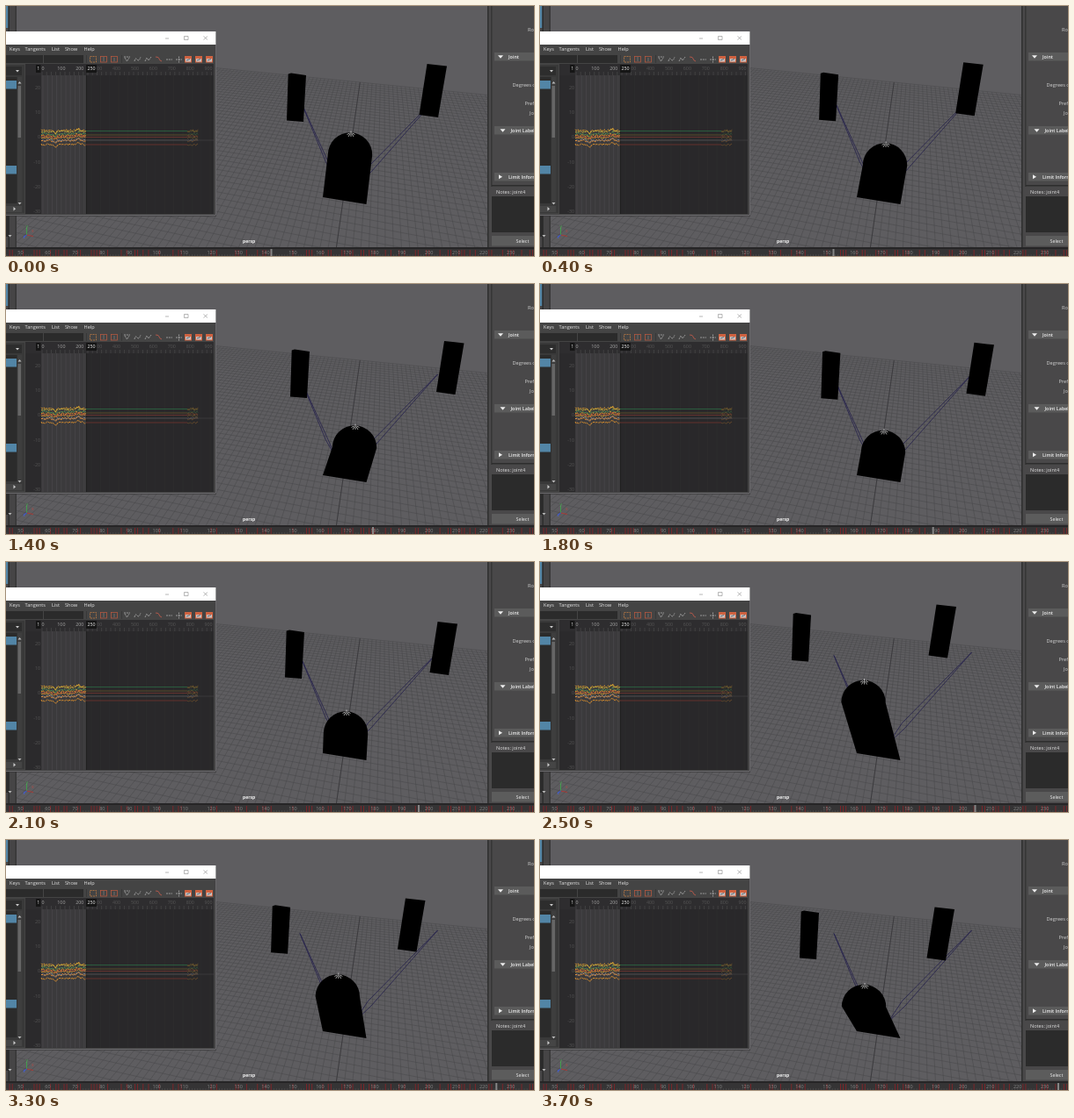
Animation of 600x285 px, one loop 3800 ms. Source, as an HTML page:

```html
<!DOCTYPE html>
<html lang="en">
<head>
<meta charset="utf-8">
<title>Graph editor and viewport</title>
<style>
html, body { margin: 0; width: 100%; height: 100%; overflow: hidden; background: #5e5d60; }
svg { display: block; width: 100vw; height: 100vh; }
text { font-family: "Open Sans", "Noto Sans", sans-serif; }
</style>
</head>
<body>
<svg id="stage" viewBox="0 0 600 285" preserveAspectRatio="none">
  <defs><clipPath id="view"><rect x="12" width="536" height="275"/></clipPath></defs>
  <g id="floor" clip-path="url(#view)"></g>
  <g id="rig">
    <path d="M334 106.500L363.500 178L376 200M334 106.500L368.500 183L376 200M490.500 103L411.500 183.500L396 207M490.500 103L415 189L396 207" fill="none" stroke="#221e4b" stroke-width=".75"/>
    <path id="left" d="M320.700 77.500L324 76.500L341 79L338 132L319 130.500Z"/>
    <path id="right" d="M478.500 66L501 68.500L491 127L469.500 124Z"/>
    <path id="body"/>
    <path id="joint" d="M-4.500 1L-1.500 -.5M-3 3.500L-1 0M0 3.500V-3M3 3.500L1 0M4.500 1L1.500 -.5" fill="none" stroke="#e4e4e4" stroke-width=".7"/>
  </g>
  <g id="ui"></g>
  <rect id="head" y="277" width="2" height="8" fill="#858585"/>
</svg>
<script>
const $ = id => document.getElementById(id);

let seed = 11;
const rnd = () => (seed = (seed * 16807) % 2147483647) / 2147483647;

const box = (x, y, w, h, fill, extra = '') =>
  `<rect x="${x}" y="${y}" width="${w}" height="${h}" fill="${fill}" ${extra}/>`;
const line = (d, color, w = 1, extra = '') =>
  `<path d="${d}" fill="none" stroke="${color}" stroke-width="${w}" ${extra}/>`;
const shape = (d, fill) => `<path d="${d}" fill="${fill}"/>`;
const label = (x, y, s, color = '#d2d2d2', size = 5.6, extra = '') =>
  `<text x="${x}" y="${y}" fill="${color}" font-size="${size}" ${extra}>${s}</text>`;
const mid = 'text-anchor="middle"';

// Perspective floor: both line families run to vanishing points on one horizon.
function drawFloor() {
  const hor = -100, vx = 429, wx = -1460, top = 187, slope = top / 1863;
  let rows = '', cols = '';
  const row = y => {
    const x = vx - (y - hor) * 27 / 190, k = (y - hor) / (x - wx);
    return `M0 ${hor - k * wx}L600 ${hor + k * (600 - wx)}`;
  };
  const col = x => {
    const m = (x - vx) / (285 - hor);
    const dy = slope * (vx - wx) / (1 - slope * m);
    return `M${vx + m * dy} ${hor + dy}L${x} 285`;
  };
  for (let n = 0; n < 52; n++) rows += row(hor + 1 / (1 / top - n / 15500));
  for (let j = -90; j < 60; j++) cols += col(374 + 9.5 * j);
  return line(rows + cols, '#474649', .5) + line(col(374), '#38373a', .8);
}

function drawCurves() {
  const sets = [
    [142, '#eda32c'], [143, '#d8c03c'], [146, '#4fa85a'], [147.5, '#ec942a'],
    [150, '#dcae33'], [149, '#c9553c'], [153, '#8d97a6'], [153.5, '#ea8c2c'],
    [158, '#f09a2c']
  ];
  let out = '';
  const noise = (y, from, to, amp) => {
    let d = '';
    for (let x = from; x <= to; x += 1.1) {
      const dip = 2.6 * Math.exp(-((x - 56) ** 2) / 5) - 2 * Math.exp(-((x - 82) ** 2) / 8);
      d += `${d ? 'L' : 'M'}${x.toFixed(1)} ${(y + dip + (rnd() - .5) * amp).toFixed(1)}`;
    }
    return d;
  };
  for (const [y, c] of sets) {
    out += line(noise(y, 40, 91, 2.4), c, .9, 'stroke-dasharray="2.5 .8"');
    out += line(noise(y, 206, 219, 2.6), c, .6, 'opacity=".4"');
  }
  [[142.5, '#2c6b45'], [147, '#65542c'], [149.5, '#74352f'], [153, '#4d4d50'], [158, '#71342f']]
    .forEach(([y, c]) => out += line(`M91 ${y}H206`, c, .8));
  return out;
}

function drawWindow() {
  let s = box(0, 29, 239, 210.500, '#333') + line('M238.300 44V238.300H0', '#77767a', 1) +
    box(0, 29, 238.5, 15, '#fff') + box(0, 44, 237.5, 193.5, '#444');
  s += line('M181 37H185M202.500 34.500H207V38.500H202.500ZM224.500 34.500L229 38.500M229 34.500L224.500 38.500', '#888', .6);
  [[4, 'Keys'], [21.5, 'Tangents'], [52, 'List'], [67, 'Show'], [88.5, 'Help']]
    .forEach(([x, t]) => s += label(x, 51.2, t, '#e4e4e4'));
  s += box(0, 56, 42, 9, '#2b2b2b') + box(43, 56, 45, 9, '#2b2b2b') + line('M91.500 56V65M131.500 56V65', '#333', .7);
  [99, 111, 123].forEach((x, i) =>
    s += box(x - 3.5, 57.5, 7, 6.5, 'none', `stroke="${i ? '#c05a3f' : '#cf8144'}" stroke-width=".7" ${i ? '' : 'stroke-dasharray="2 1"'}`));
  s += line('M111 58V63M123 59V63', '#999', .5);
  s += line('M134 58H141M135 59L137.500 63L140 59M146 63Q147 58 149 61T153 58M158 63L160 59L162 62L165 58M182 61H189M193 61H200M196.500 57.500V64.500', '#bdbdbd', .7, 'stroke-dasharray="2 .8"');
  s += line('M170 58Q174 58 174 60T177 63', '#c85c4c', .8);
  [207, 219, 231].forEach(x =>
    s += box(x - 4, 57, 8, 7.5, '#cf6240') + box(x - 3, 60, 6, 3.5, '#c9c3c2') + line(`M${x - 2} 62L${x + 2} 60.500`, '#46505c', .8));

  // Outliner column
  s += box(0, 67, 21, 169, '#393939') + box(0, 69, 18, 10, '#2d2d2d') +
    shape('M11 73h4l-2 2.500z', '#ccc') +
    box(0, 81, 12.5, 144, '#2b2b2b') + box(0, 85, 12, 9.5, '#5285a6') + box(0, 182, 12, 9.5, '#5285a6') +
    box(13, 81, 5, 144, '#3e3e3e') + box(13.5, 91, 3.5, 59, '#666') +
    shape('M13.500 88.500h4l-2 -2.500z', '#bbb') + shape('M13.500 224h4l-2 2.500z', '#bbb') +
    box(0, 228, 18, 7, '#454545') + shape('M8.500 229v4.500l2.500 -2.200z', '#ccc');

  // Graph area
  s += box(22, 66, 214, 171, '#29282a') + box(22, 66, 214, 13, '#2e2d2f') +
    box(22, 79, 18, 158, '#2b2a2c') + box(40, 79, 51.5, 158, '#3b3a3c');
  let v = '', u = '';
  for (let x = 42; x < 91; x += 5.2) v += `M${x} 79V237`;
  for (let x = 97; x < 236; x += 10.4) u += `M${x} 79V237`;
  s += line(v, '#4b4a4c', .7) + line(u, '#2f2e30', .7) + line('M40 153H236', '#454446', .6);
  for (let i = 0; i < 10; i++)
    s += label(42 + 20.9 * i, 73, i * 100, i < 3 ? '#a5a5a5' : '#565656', 5.3, mid);
  let ticks = '';
  for (let x = 41; x < 236; x += 5.2) ticks += `M${x} 75V79`;
  s += line(ticks, '#505050', .6);
  s += box(34, 67, 5.5, 9, '#161616') + label(36.7, 73.3, 1, '#eee', 5.3, mid) +
    box(91, 67, 12, 9, '#161616') + label(97, 73.3, 250, '#eee', 5.3, mid);
  for (let i = 0; i < 6; i++)
    s += label(39, 95 + 28.2 * i, 20 - 10 * i, '#555', 5.3, 'text-anchor="end"');
  return s + line('M91.500 79V237', '#1c1c1c', .8) + drawCurves();
}

function drawSide() {
  let s = box(548, 0, 52, 275, '#494849') + box(547, 0, 1.5, 275, '#2f2f2f') +
    box(551, 0, 1.5, 206, '#363636');
  s += label(593, 29, 'Ro') + label(575.5, 92, 'Degrees of') + label(589.5, 112.5, 'Prefer') + label(595, 123.5, 'Jo');
  [[53, 'Joint', 571], [137, 'Joint Labelling', 573.5], [190, 'Limit Information', 571]]
    .forEach(([y, t, x], i) => {
      s += box(555, y, 45, 9.5, '#5b5b5b') + label(x, y + 7, t, '#eee', 5.4, 'font-weight="600"');
      s += i < 2 ? shape(`M${x - 12} ${y + 3.2}h6l-3 3.500z`, '#eee') : shape(`M560 ${y + 2.2}v5l4 -2.500z`, '#eee');
    });
  return s + box(552, 204, 48, 1.5, '#2d2d2d') + label(557, 213.5, 'Notes: joint4', '#e0e0e0') +
    box(552, 217, 48, 41, '#2b2b2b') + box(552, 262, 48, 11.5, '#5c5c5c') + label(579.5, 269.7, 'Select', '#eee', 5.4);
}

function drawTimeline() {
  let s = box(0, 275, 600, 10, '#353435') + box(0, 275, 600, 2, '#262526'), red = '', gray = '';
  const at = f => 16.5 + (f - 50) * 3.095;
  for (let f = 45; f < 240; f++) {
    if (rnd() < .42) red += `M${at(f)} 278V285`;
    else gray += `M${at(f)} 283V285`;
  }
  s += line(gray, '#555', .5) + line(red, '#8f2427', .8);
  for (let f = 50; f <= 230; f += 10)
    s += label(at(f), 283, f, '#858585', 5.5, mid);
  return s;
}

function drawLeftEdge() {
  return box(0, 0, 12, 275, '#464546') + box(0, 0, 2.5, 25, '#5285a6') + box(2.5, 0, 1.5, 275, '#2d2d2d') +
    box(10.5, 0, 1.5, 275, '#363636') + box(0, 239, 3, 24, '#2b2b2b') +
    shape('M2.500 261h4l-2 2.500z', '#bbb');
}

function drawGizmo() {
  return line('M23.500 261V253', '#3fa34a', .9) + line('M23.500 261L31 262.500', '#b53a35', .9) +
    line('M23.500 261L20 263.500', '#3954c5', 1.2) + label(22.5, 253, 'y', '#4fb558', 5) +
    label(29, 258, 'x', '#b04a45', 5) + label(19.5, 264.5, 'z', '#4b65d2', 5) +
    label(269, 269.5, 'persp', '#f2f2f2', 5.1, 'font-weight="700"');
}

$('floor').innerHTML = drawFloor();
$('ui').innerHTML = drawLeftEdge() + drawGizmo() + drawWindow() + drawSide() + drawTimeline();

// time, left block offset, right block offset, dome centre, playhead
const poses = [
  [0, 0, 0, 0, 0, 391, 169, 300.5],
  [900, -4.5, -1.5, 6.5, -4, 393.5, 197.5, 372.5],
  [1400, 4, -2, 19.5, -1, 396, 186, 416],
  [2100, -2, 1, 12, 2, 386, 195, 468],
  [2500, -33, -18.5, -28, -17.5, 367.5, 159.5, 493.5],
  [3000, -14, -6.5, -21, -6, 382.5, 170.5, 532.5],
  [3700, -24, 4, -30, 10.5, 368, 189.5, 588]
];
const loop = 3800, step = 100, r = 25.2;
const ease = k => k * k * (3 - 2 * k);

function poseAt(t) {
  let i = 0;
  while (i < poses.length - 2 && t >= poses[i + 1][0]) i++;
  const a = poses[i], b = poses[i + 1];
  const k = Math.min(1, (t - a[0]) / (b[0] - a[0]));
  const mix = (n, p) => a[n] + (b[n] - a[n]) * p;
  return { part: [1, 2, 3, 4, 5, 6].map(n => mix(n, ease(k))), head: mix(7, k) };
}

function show(t) {
  const { part: [lx, ly, rx, ry, cx, cy], head } = poseAt(t);
  $('left').setAttribute('transform', `translate(${lx} ${ly})`);
  $('right').setAttribute('transform', `translate(${rx} ${ry})`);
  $('body').setAttribute('d',
    `M360 218L${cx - r} ${cy}A${r} ${r} 0 0 1 ${cx + r} ${cy + 1}L409.500 226Z`);
  $('joint').setAttribute('transform', `translate(${cx + 1} ${cy - 23.5})`);
  $('head').setAttribute('x', head);
}

const start = performance.now();
function tick() {
  const t = (performance.now() - start) % loop;
  show(Math.floor(t / step) * step);
  requestAnimationFrame(tick);
}
show(0);
requestAnimationFrame(tick);
</script>
</body>
</html>
```
